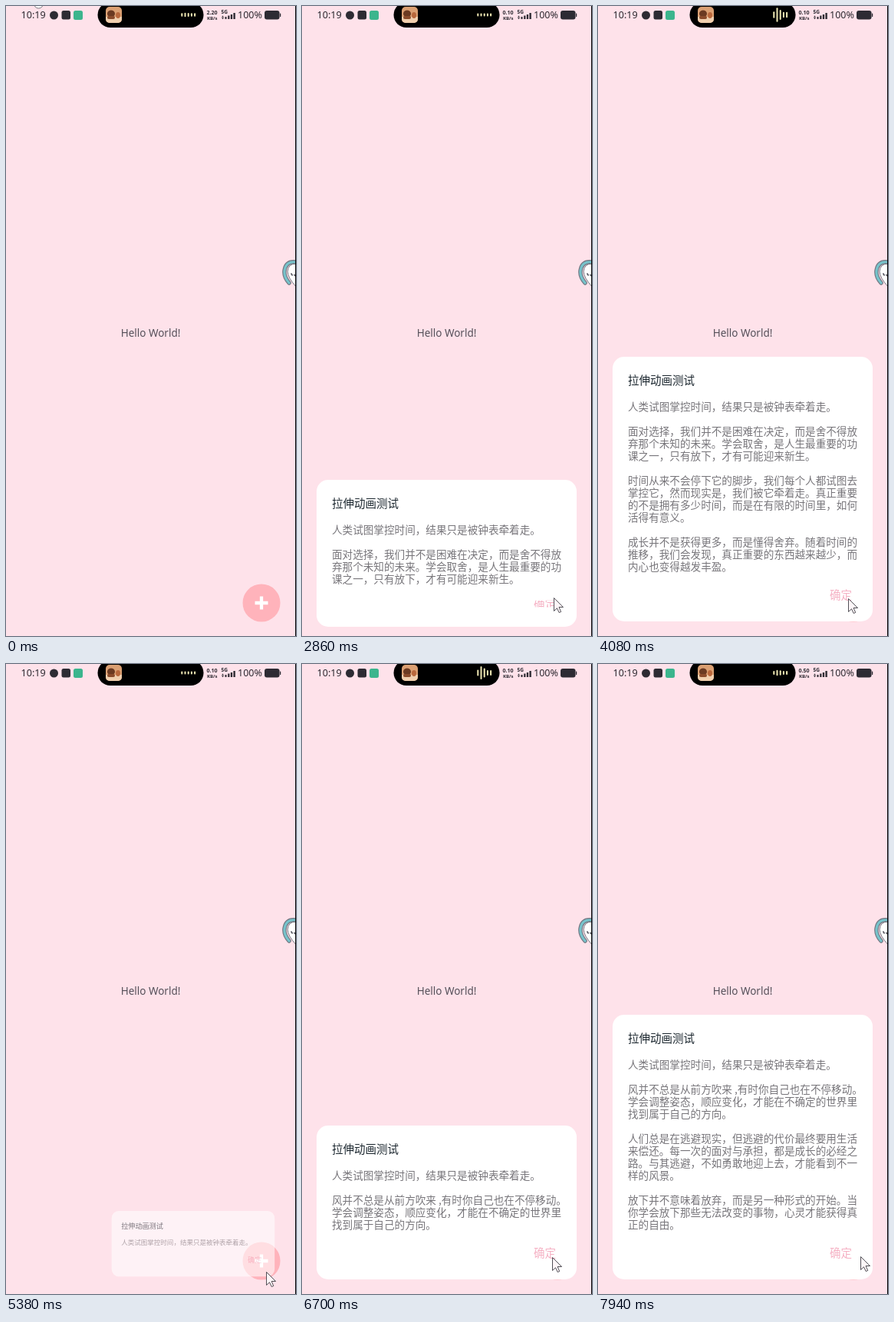
These frames come from a looping animation (378 by 819 pixels, 8 s). An HTML page:

```html
<!DOCTYPE html>
<html lang="zh-CN">
<head>
<meta charset="utf-8">
<title>拉伸动画测试</title>
<style>
  html, body { margin: 0; width: 100%; height: 100%; overflow: hidden; background: #fee2ea; }
  #stage { position: relative; width: 378px; height: 819px; overflow: hidden; }
  svg { position: absolute; left: 0; top: 0; width: 378px; height: 819px; }
  svg text { font-family: "Noto Sans", "Open Sans", sans-serif; fill: #2d2b33; }
  #card {
    position: absolute; left: 19px; width: 339px; overflow: hidden;
    border-radius: 15px; background: #fff;
    transform-origin: calc(100% - 21px) calc(100% - 10px);
    font-family: "Noto Sans CJK SC", "Noto Sans CJK", sans-serif;
    white-space: pre;
  }
  #card > * { position: absolute; left: 20px; }
  #title { top: 20px; font-size: 14.5px; line-height: 20px; font-weight: 500; color: #1d2830; }
  #body { top: 56px; font-size: 13.6px; line-height: 16px; color: #77757a; }
  #body p { margin: 0 0 16px; }
  #card > #ok { left: 283px; font-size: 14.5px; line-height: 20px; font-weight: 500; color: #f5b0c3; }
</style>
</head>
<body>
<div id="stage">
  <svg viewBox="0 0 378 819">
    <text x="19.5" y="16" font-size="12.6" font-weight="500">10:19</text>
    <circle cx="62.5" cy="12" r="5.5" fill="#2d2b33"/>
    <rect x="72.5" y="6" width="11.5" height="11.5" rx="2.5" fill="#2d2b33"/>
    <rect x="88" y="6" width="12" height="12" rx="2.5" fill="#3bb58d"/>

    <rect x="119.5" y="-5" width="138" height="33" rx="16.5"/>
    <clipPath id="cover"><rect x="130" y="1" width="21" height="21" rx="5"/></clipPath>
    <g clip-path="url(#cover)">
      <rect x="130" y="1" width="21" height="21" fill="#dba073"/>
      <rect x="130" y="14" width="21" height="8" fill="#f0cfae"/>
      <ellipse cx="137" cy="10" rx="5" ry="4.5" fill="#6b3a22"/>
      <ellipse cx="146" cy="12" rx="3" ry="4" fill="#b9683c"/>
      <rect x="132" y="13" width="10" height="4" rx="2" fill="#8a4b2b"/>
    </g>
    <g id="wave" stroke="#efe8b4" stroke-width="2" stroke-linecap="round"></g>

    <text id="speed" x="261.5" y="10.5" font-size="7" font-weight="700"></text>
    <text x="262" y="17.5" font-size="6" font-weight="700">KB/s</text>
    <text x="280.5" y="10" font-size="6.5" font-weight="700">5G</text>
    <path d="M281 14.5l1.5-2 1.5 2zM281 15.3h3l-1.5 2zM285.5 14h2v3h-2zM289.2 12.5h2.2v4.5h-2.2zM292.8 11h2.3v6h-2.3zM296.4 9h2.4v8h-2.4z" fill="#2d2b33"/>
    <text x="302" y="16" font-size="12.5" font-weight="500">100%</text>
    <rect x="337" y="6" width="19.5" height="11.5" rx="3" fill="#2d2b33"/>
    <rect x="357" y="9.5" width="1.2" height="4.5" rx=".6" fill="#2d2b33"/>

    <text x="188.5" y="430" font-size="13.5" text-anchor="middle" style="fill:#55505a">Hello World!</text>

    <path d="M378 335Q368 335 367 345Q367 353 379 366Z" fill="#fff" stroke="#747681"/>
    <g fill="none" stroke-linecap="round">
      <path d="M378 333Q365 331 363 344Q362 352 369 360" stroke="#747681" stroke-width="5.5"/>
      <path d="M378 333Q365 331 363 344Q362 352 369 360" stroke="#76c3cb" stroke-width="3.2"/>
    </g>
    <path d="M371.5 347.5l2 3M375.5 349l1.5 2" stroke="#55565f" stroke-width="1.6"/>

    <circle cx="333" cy="776" r="24.5" fill="#ffb3bb"/>
    <path d="M324.5 776h17M333 767.5v17" stroke="#fff" stroke-width="4.3"/>
  </svg>

  <div id="card">
    <div id="title">拉伸动画测试</div>
    <div id="body"></div>
    <div id="ok">确定</div>
  </div>

  <svg viewBox="0 0 378 819">
    <rect x="377" width="1" height="819"/>
    <circle id="ring" cx="42.5" cy="-3" r="6" fill="#fff" stroke="#77757d"/>
    <path id="pointer" d="M.5.5V17.5L4.500 13.800L7.200 19.500L9.700 18.500L7.100 12.500H12.500Z" fill="#fdf6f8" stroke="#3f3d44" stroke-width=".9"/>
  </svg>
</div>
<script>
const LOOP = 8000, BOTTOM = 800, BASE = 136;
const $ = id => document.getElementById(id);
const card = $('card'), body = $('body'), ok = $('ok'), pointer = $('pointer');
const clamp = x => Math.min(1, Math.max(0, x));
const easeOut = x => 1 - (1 - clamp(x)) ** 3;
const smooth = x => x * x * (3 - 2 * x);

const INTRO = '人类试图掌控时间，结果只是被钟表牵着走。';
const rounds = [
  { open: 1602, grow: [2733, 3323, 3810], close: 4280, text: [INTRO,
    '面对选择，我们并不是困难在决定，而是舍不得放\n弃那个未知的未来。学会取舍，是人生最重要的功\n课之一，只有放下，才有可能迎来新生。',
    '时间从来不会停下它的脚步，我们每个人都试图去\n掌控它，然而现实是，我们被它牵着走。真正重要\n的不是拥有多少时间，而是在有限的时间里，如何\n活得有意义。',
    '成长并不是获得更多，而是懂得舍弃。随着时间的\n推移，我们会发现，真正重要的东西越来越少，而\n内心也变得越发丰盈。'] },
  { open: 5283, grow: [6433, 7010, 7545], close: Infinity, text: [INTRO,
    '风并不总是从前方吹来 ,有时你自己也在不停移动。\n学会调整姿态，顺应变化，才能在不确定的世界里\n找到属于自己的方向。',
    '人们总是在逃避现实，但逃避的代价最终要用生活\n来偿还。每一次的面对与承担，都是成长的必经之\n路。与其逃避，不如勇敢地迎上去，才能看到不一\n样的风景。',
    '放下并不意味着放弃，而是另一种形式的开始。当\n你学会放下那些无法改变的事物，心灵才能获得真\n正的自由。'] }
];

// Pointer stops: time, x, y
const stops = [[60, 38, 0], [860, 357, 693], [1560, 333, 732], [1740, 333, 738],
  [2700, 328, 769], [4080, 326, 770], [4400, 326, 770], [4950, 345, 790],
  [5400, 339, 790], [6300, 326, 771], [7540, 326, 771], [7900, 342, 770]];

const bars = [9, 20, 14, 8, 8].map((peak, i) => {
  const line = document.createElementNS('http://www.w3.org/2000/svg', 'line');
  $('wave').append(line);
  return { line, peak, x: 229.3 + i * 4.2 };
});

let shown = '';
function showText(round, count) {
  const key = round.open + '/' + count;
  if (key === shown) return;
  shown = key;
  body.replaceChildren(...round.text.slice(0, count).map(text => {
    const p = document.createElement('p');
    p.textContent = text;
    return p;
  }));
}

function drawCard(t) {
  const round = rounds.find(r => t >= r.open && t < r.close + 300);
  card.style.display = round ? 'block' : 'none';
  if (!round) return;

  let height = BASE, top = BOTTOM - BASE, count = 1, last = 1;
  round.grow.forEach((start, i) => {
    if (t < start) return;
    const added = 16 + 16 * round.text[i + 1].split('\n').length;
    last = easeOut((t - start) / 260);
    height += added * last;
    top -= added * last * last; // the top edge trails the height
    count++;
  });
  showText(round, count);

  const scale = t < round.close
    ? easeOut((t - round.open) / 350)
    : (1 - (t - round.close) / 300) ** 2;
  card.style.top = top + 'px';
  card.style.height = height + 'px';
  card.style.transform = `scale(${scale})`;
  card.style.opacity = scale ** 1.2;

  const hidden = 1 - last;
  ok.style.top = height - 45 + 38 * hidden + 'px';
  ok.style.clipPath = `inset(${hidden ? 3 + 20 * hidden : 0}px 0)`;
}

function drawPointer(t) {
  $('ring').style.display = t < 60 ? '' : 'none';
  pointer.style.display = t < 60 ? 'none' : '';
  const next = stops.findIndex(s => s[0] > t);
  const b = stops[next < 0 ? stops.length - 1 : next];
  const a = next > 0 ? stops[next - 1] : b;
  const k = a === b ? 0 : smooth((t - a[0]) / (b[0] - a[0]));
  pointer.setAttribute('transform',
    `translate(${a[1] + (b[1] - a[1]) * k} ${a[2] + (b[2] - a[2]) * k})`);
}

function drawStatus(t) {
  const level = (0.5 + 0.5 * Math.cos((t - 1600) / 360 * 2 * Math.PI)) ** 0.7;
  for (const { line, peak, x } of bars) {
    const half = (4 + (peak - 4) * level) / 2 - 1;
    line.setAttribute('x1', x);
    line.setAttribute('x2', x);
    line.setAttribute('y1', 11.5 - half);
    line.setAttribute('y2', 11.5 + half);
  }
  $('speed').textContent = t < 900 ? '2.20' : t < 7600 ? '0.10' : '0.50';
}

const began = performance.now();
function frame() {
  const t = (performance.now() - began) % LOOP;
  drawCard(t);
  drawPointer(t);
  drawStatus(t);
  requestAnimationFrame(frame);
}
frame();
</script>
</body>
</html>
```
